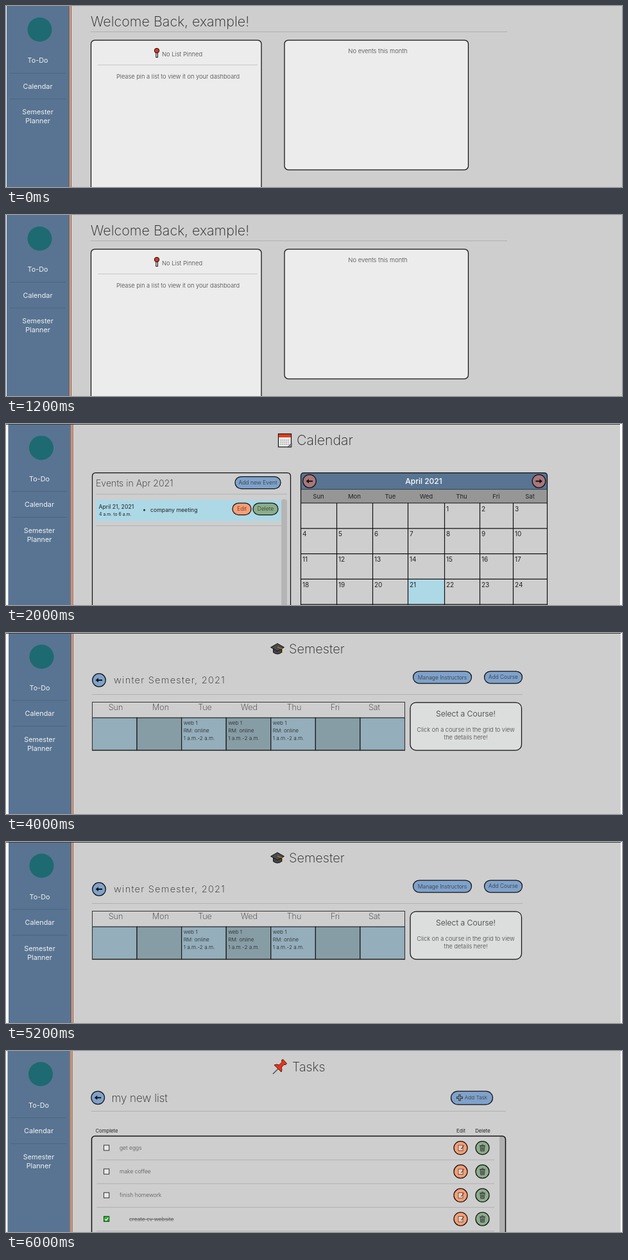
These frames come from a looping animation (960x284 px, 8 s). An HTML page:

```html
<!DOCTYPE html>
<html lang="en">
<head>
<meta charset="utf-8">
<title>Student planner</title>
<style>
html, body { margin: 0; width: 100%; height: 100%; overflow: hidden; background: #fff; }
svg { display: block; width: 960px; height: 284px; }
text { font-family: Inter, "Open Sans", sans-serif; white-space: pre; }
</style>
</head>
<body>
<svg id="stage" viewBox="0 0 960 284"></svg>
<script>
const INK = '#111', BLUE = '#7ea2cb', NAVY = '#587492', SKY = '#add8e6',
  ORANGE = '#ff9d72', GREEN = '#8aae8a', GRAY = '#cecece';
const DAYS = ['Sun', 'Mon', 'Tue', 'Wed', 'Thu', 'Fri', 'Sat'];

const rect = (x, y, w, h, fill, extra = '') =>
  `<rect x="${x}" y="${y}" width="${w}" height="${h}" fill="${fill}" ${extra}/>`;
const box = (x, y, w, h, fill, r, width = 1.25) =>
  rect(x, y, w, h, fill, `rx="${r}" stroke="${INK}" stroke-width="${width}"`);
const circle = (x, y, r, fill, extra = '') =>
  `<circle cx="${x}" cy="${y}" r="${r}" fill="${fill}" ${extra}/>`;
const path = (d, stroke, width = 1, fill = 'none') =>
  `<path d="${d}" stroke="${stroke}" stroke-width="${width}" fill="${fill}"/>`;
const rule = (x1, x2, y, color = '#b0b0b0') => path(`M${x1} ${y}H${x2}`, color);
const at = (x, y, content) => `<g transform="translate(${x} ${y})">${content}</g>`;

// y is the middle of the capital letters
const text = (x, y, s, size, color = '#444', weight = 300, extra = '') =>
  `<text x="${x}" y="${y + size * .36}" font-size="${size}" fill="${color}" font-weight="${weight}" ${extra}>${s}</text>`;
const mid = (x, y, s, size, color, weight) =>
  text(x, y, s, size, color, weight, 'text-anchor="middle"');
const title = (x, y, s, size, extra) => text(x, y, s, size, '#222', 200, extra);

const pill = (x, y, w, h, fill, label, size = 8.5, dx = 0) =>
  box(x, y, w, h, fill, h / 2) + mid(x + w / 2 + dx, y + h / 2, label, size, '#333');
const ring = (x, y, fill, r = 10.3) =>
  circle(x, y, r, fill, `stroke="${INK}" stroke-width="1.25"`);
const arrow = (x, y, dir, fill) => ring(x, y, fill) +
  at(x, y, path(`M${-5 * dir} 0H${3 * dir}`, INK, 2) +
    path(`M${5.5 * dir} 0L${dir} -3.5V3.5Z`, 'none', 0, INK));

function page(x, right, dy, content, topLine) {
  const cx = x + 48.5;
  return rect(x, 0, right - x, 284, GRAY) +
    rect(x, 0, 97, 284, NAVY) +
    rect(x + 97, 0, 4, 284, '#eaa682') +
    rect(x + 97, 0, 1, 284, '#5f5b62') + rect(x + 100, 0, 1, 284, '#7c5a4c') +
    circle(x + 51.5, 37 + dy, 19, '#1d6a72') +
    [[85.5, 'To-Do'], [126, 'Calendar'], [166.5, 'Semester'], [180.5, 'Planner']]
      .map(([y, s]) => mid(cx, y + dy, s, 10.8, '#f2f2f2', 400)).join('') +
    rule(x + 5, x + 92, 105.5 + dy, '#4b6580') + rule(x + 5, x + 92, 146 + dy, '#4b6580') +
    content + (topLine ? rect(0, 0, right, 1, '#3a3a3a') : '');
}

function dashboard() {
  return title(132, 24.5, 'Welcome Back, example!', 21.5) + rule(132, 781, 40.5) +
    box(132.5, 53.5, 265.5, 250, '#ececec', 6) + box(434, 53.5, 286.5, 203.5, '#ececec', 6) +
    rect(233.8, 72, 2.6, 8.5, '#ddd', `stroke="${INK}"`) +
    circle(235, 70, 3.7, '#dc3520', `stroke="${INK}"`) +
    mid(274.5, 75.5, 'No List Pinned', 9.4) + rule(143, 392, 92.5, '#c6c6c6') +
    mid(268, 111, 'Please pin a list to view it on your dashboard', 9.3) +
    mid(579.5, 70.5, 'No events this month', 9.4);
}

function calendar() {
  const cols = [459.5, 515.5, 571.5, 626.5, 683.5, 738.5, 790.5, 843.5];
  const dayX = [487, 543, 599, 655, 710, 764, 816.5];
  const rowY = i => 124 + i * 39.8;
  let s = rect(424.5, 15.5, 20, 20.5, '#eee', `stroke="${INK}" stroke-width="1.2"`) +
    rect(425, 16, 19, 5, '#e23d1c');
  for (let i = 0; i < 15; i++)
    s += rect(427.5 + i % 5 * 3, 24.5 + (i / 5 | 0) * 3.2, 1.8, 1.8, '#aaa');
  s += path('M439 36L445 30V36Z', INK, .6, '#888') +
    title(453, 25.5, 'Calendar', 21.3) +
    box(134.5, 76.5, 309, 230, 'none', 5) +
    title(140, 92.5, 'Events in Apr 2021', 14.2) +
    pill(357, 82.5, 71, 19, BLUE, 'Add new Event', 8.6) + rule(140, 438, 110) +
    rect(140, 119, 288.5, 33.5, SKY) + rect(429, 118, 9, 180, '#b5b5b5', 'rx="4"') +
    text(144.5, 130, 'April 21, 2021', 8.7, '#222', 400) +
    text(145, 142, '4 a.m. to 6 a.m.', 6.9, '#222', 400) +
    circle(215.5, 135, 1.5, '#222') + text(225, 135, 'company meeting', 8.7, '#222', 400) +
    pill(353, 124, 29, 18.5, ORANGE, 'Edit') + pill(385, 124, 39, 18.5, GREEN, 'Delete') +
    rule(140, 429, 159.5);

  s += path('M459.5 103V81.5Q459.5 76.5 464.5 76.5H838.5Q843.5 76.5 843.5 81.5V103Z', INK, 1.25, NAVY) +
    mid(651, 90, 'April 2021', 12, '#fff', 500) +
    arrow(473, 89.7, -1, '#a9777b') + arrow(830.5, 89.7, 1, '#a9777b') +
    rect(459.5, 103, 384, 21, '#969696') +
    dayX.map((x, i) => mid(x, 113.5, DAYS[i], 9.6, '#222', 400)).join('') +
    rect(cols[3], rowY(3), 57, 40, SKY);
  for (let d = 1; d < 25; d++) {
    const cell = d + 3;
    s += text(cols[cell % 7] + 2.5, rowY(cell / 7 | 0) + 9, d, 10, '#222', 400);
  }
  for (const x of cols) s += path(`M${x} ${x === cols[0] || x === cols[7] ? 103 : 124}V284`, INK, 1.2);
  for (let i = 0; i < 5; i++) s += path(`M459 ${rowY(i)}H844`, INK, 1.2);
  return s;
}

function semester() {
  const dayX = [171, 241, 310, 379, 449, 513, 574], w = 69.57;
  let s = path('M416.5 25V30.5Q423 35.5 429.5 30.5V25Z', INK, 1, '#444') +
    path('M412.5 22.5L423 16.5L433.5 22.5L423 28.5Z', INK, 1, '#4a4a4a') +
    path('M423 22L430.5 25V31', '#c48f2a', 1) +
    title(441, 25, 'Semester', 20) +
    arrow(145, 74, -1, BLUE) +
    title(168, 73.5, 'winter Semester, 2021', 14.6, 'letter-spacing="1.25"') +
    pill(634.5, 60, 91, 19, BLUE, 'Manage Instructors') +
    pill(745.5, 60, 59, 19, BLUE, 'Add Course', 8.3) + rule(134, 805, 96.5);
  DAYS.forEach((day, i) => {
    const x = 134.5 + i * w;
    s += mid(dayX[i], 116, day, 12.6, '#333', 200) +
      rect(x, 133, w, 51, i % 2 ? '#879da6' : '#94aebb', `stroke="${INK}" stroke-width="1.1"`);
    if (i > 1 && i < 5)
      ['web 1', 'RM: online', '1 a.m.-2 a.m.'].forEach((line, j) =>
        s += text(x + 3, 141.5 + j * 12, line, 8.2, '#222'));
  });
  return s + rect(134.5, 108.5, 487, 75.5, 'none', 'stroke="#333"') +
    box(630, 109, 173.5, 75, '#dcdddd', 9) +
    mid(716.5, 126.5, 'Select a Course!', 12.2, '#333') +
    mid(716.5, 151.5, 'Click on a course in the grid to view', 9.2) +
    mid(716.5, 163.5, 'the details here!', 9.2);
}

function tasks() {
  const note = rect(-3.5, -4, 7, 8.5, '#f1eee6', 'stroke="#333" stroke-width=".8"') +
    path('M-2 -1.5H1M-2 .5H1M-2 2.5H1', '#999', .7) + path('M5 -4L1 2', '#a33c20', 1.4);
  const bin = path('M-3.5 -3H3.5L2.7 5H-2.7Z', '#333', .9, '#7d887d') +
    path('M-4.5 -3.5H4.5M-1.5 -5H1.5M-1 -1V3.5M1 -1V3.5', '#333', .9);
  const pin = path('M-2 3L-10.5 11.5', '#555', 1.6) +
    path('M-8.5 -2.5Q-4 -4.5 -1 -2.5L3.5 -7L3 -10L5 -11.5L11 -5L9.5 -3L6.5 -3L2.5 1.5Q4.5 5 2.5 8.5Z', '#5a1710', 1, '#e2351b');
  let s = at(426.5, 24.5, pin) + title(446, 24.5, 'Tasks', 19.8) +
    arrow(143.2, 73.3, -1, BLUE) + title(164.5, 73.5, 'my new list', 17) +
    pill(693.5, 63, 65, 21, BLUE, 'Add Task', 8.2, 6.5) +
    path('M707 68.2V78.2M702 73.2H712', '#333', 3.4) + path('M707 69.2V77.2M703 73.2H711', '#8797ad', 1.4) +
    rule(133, 779, 94.5) + text(139.5, 125, 'Complete', 7.7, '#222', 400) +
    mid(709, 125, 'Edit', 7.8, '#222', 400) + mid(743, 125, 'Delete', 7.8, '#222', 400) +
    rect(769, 134, 9, 160, '#b0b0b0') + box(133.5, 133.5, 645, 180, 'none', 5, 1.5);
  ['get eggs', 'make coffee', 'finish homework', 'create cv website'].forEach((task, i) => {
    const y = 152 + i * 37.2, done = i === 3;
    s += rect(152.5, y - 4.2, 8.2, 8.2, done ? '#16bd1b' : '#e8e8e8', 'stroke="#333"') +
      (done ? path(`M154 ${y}l2 2l3.5 -4`, '#fff', 1.3) : '') +
      text(done ? 192 : 177, y, task, 8.5, '#555', 300, done ? 'text-decoration="line-through"' : '') +
      ring(708.5, y, ORANGE, 10.5) + at(708.5, y, note) +
      ring(742.5, y, GREEN, 10.5) + at(742.5, y, bin) +
      rule(141, 761, y + 18.9);
  });
  return s;
}

const pages = [
  page(1, 960, 0, dashboard()),
  page(3.5, 957, .4, calendar(), true),
  page(4, 958, .2, semester(), true),
  page(2.5, 958, -.7, tasks())
];
const stage = document.getElementById('stage');
let shown = -1;

function draw(now) {
  const i = Math.floor(now % 8000 / 2000);
  if (i !== shown) stage.innerHTML = pages[shown = i];
  requestAnimationFrame(draw);
}
draw(performance.now());
</script>
</body>
</html>
```
